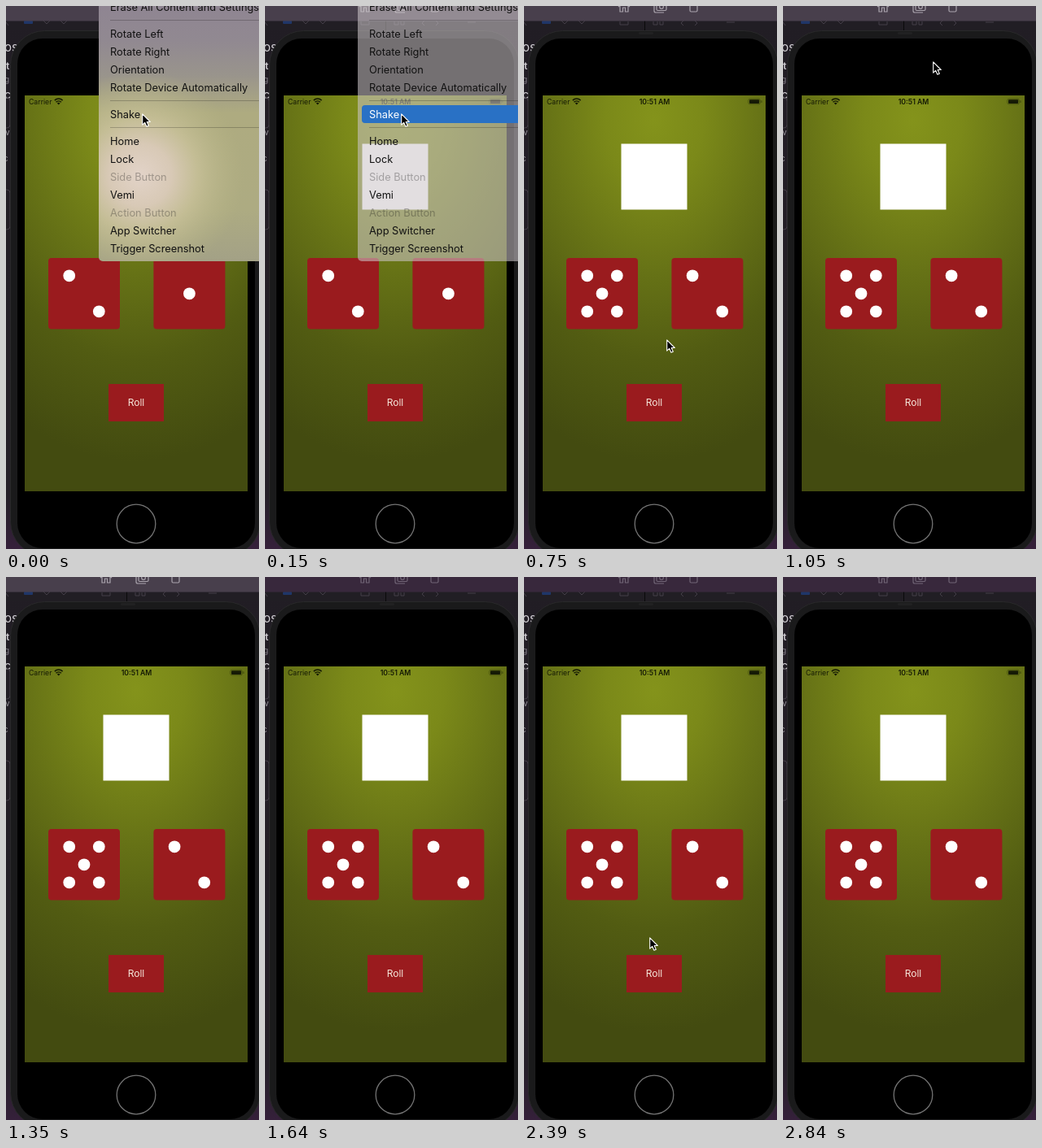
An HTML page that plays this animation: 311 px wide and 668 px high, repeating every 2990 ms.

```html
<!DOCTYPE html>
<html lang="en">
<head>
<meta charset="utf-8">
<title>Dice simulator</title>
<style>
  html, body { margin: 0; width: 100%; height: 100%; overflow: hidden; background: #1f1b22; }
  svg { display: block; width: 100%; height: 100%; }
  text { font-family: Inter, Roboto, "Liberation Sans", sans-serif; }
  .pip { fill: #fff; }
  .red { fill: #9a1b1e; }
</style>
</head>
<body>
<svg viewBox="0 0 311 668" xmlns="http://www.w3.org/2000/svg">
  <defs>
    <radialGradient id="felt" gradientUnits="userSpaceOnUse" cx="0" cy="0" r="1"
      gradientTransform="translate(160 140) scale(300 420)">
      <stop offset="0" stop-color="#84931b"/>
      <stop offset=".2" stop-color="#7b8919"/>
      <stop offset=".45" stop-color="#667216"/>
      <stop offset=".7" stop-color="#525c12"/>
      <stop offset="1" stop-color="#434b10"/>
    </radialGradient>
    <linearGradient id="frost" x1="0" y1="0" x2="0" y2="1">
      <stop offset="0" stop-color="#8f8592"/>
      <stop offset=".14" stop-color="#918991"/>
      <stop offset=".27" stop-color="#99948c"/>
      <stop offset=".42" stop-color="#aeab80"/>
      <stop offset=".8" stop-color="#adab82"/>
      <stop offset="1" stop-color="#a3a186"/>
    </linearGradient>
    <radialGradient id="glow" gradientUnits="userSpaceOnUse" cx="165" cy="208" r="128">
      <stop offset="0" stop-color="#e2d3c8"/>
      <stop offset=".3" stop-color="#d8c9b6"/>
      <stop offset=".55" stop-color="#c6bf97" stop-opacity=".9"/>
      <stop offset="1" stop-color="#b6b483" stop-opacity="0"/>
    </radialGradient>
    <linearGradient id="desk" x1="0" y1="0" x2="0" y2="1">
      <stop offset="0" stop-color="#211d24"/>
      <stop offset=".9" stop-color="#251f28"/>
      <stop offset="1" stop-color="#35203a"/>
    </linearGradient>
  </defs>

  <rect width="311" height="668" fill="url(#desk)"/>
  <g id="editor">
    <rect y="18" width="311" height="12" fill="#211e24"/>
    <rect x="22" y="18" width="11" height="4" rx="1" fill="#1f3668"/>
    <g fill="none" stroke="#443e48">
      <path d="M0 20l3 4M46 18l4 4 4-4M67 18l4 4 4-4M118 19v4h10v-4M159 19v4h5v-4M167 19v4h4v-4M196 18l-3 3 3 3M210 18l3 3-3 3M249 20h10"/>
    </g>
    <path d="M148.500 18v12" stroke="#09090a"/>
    <g fill="#d2cfd4">
      <text x="-2" y="56" font-size="15">os</text>
      <text x="0" y="78" font-size="12" font-weight="600">t</text>
      <text x="-2" y="94" font-size="10" fill="#827d86">g</text>
      <text x="-2" y="114" font-size="14">c</text>
      <text x="-1" y="159" font-size="10" fill="#98949b">v</text>
      <text x="-3" y="191" font-size="10" fill="#98949b">c</text>
    </g>
    <g fill="none" stroke="#443e48">
      <rect x="-12" y="113" width="17" height="37" rx="4"/>
      <rect x="-12" y="226" width="17" height="49" rx="4"/>
    </g>
  </g>
  <rect id="bar" width="311" height="18.500"/>
  <g id="barIcons" fill="none" stroke-width="1.200">
    <path d="M116 1l7-6 7 6M118 0v7h3.500V2h3v5h3.500V0"/>
    <path d="M160 0v6q0 2 2 2h10M163-4h12v8q0 1.500-1.500 1.500h-9q-1.500 0-1.500-1.500z"/>
    <circle cx="169" cy="1" r="2.300"/>
    <rect x="204" y="-7" width="9" height="14" rx="1.500"/>
  </g>

  <rect x="5.500" y="30.500" width="307" height="646" rx="42" fill="#1a1a1b" stroke="#29292a"/>
  <rect x="141" y="32" width="18" height="3" rx="1" fill="#212122"/>
  <rect x="14" y="40" width="292" height="627" rx="31" fill="#000"/>
  <circle cx="160" cy="637" r="23.800" fill="none" stroke="#737373" stroke-width="1.300"/>
  <rect x="23" y="110" width="274" height="487" fill="url(#felt)"/>

  <g fill="#151a05">
    <text x="28" y="120.800" font-size="8.700">Carrier</text>
    <text x="160.500" y="120.800" font-size="8.700" font-weight="600" text-anchor="middle">10:51 AM</text>
    <path d="M62.800 119.600l1.900 2 1.900-2a2.700 2.700 0 0 0-3.800 0z"/>
    <path d="M61.500 118.200a4.600 4.600 0 0 1 6.400 0M59.800 116.100a7 7 0 0 1 9.800 0" fill="none" stroke="#151a05" stroke-width="1.500"/>
    <rect x="275.800" y="114.300" width="14.600" height="6.600" rx="2" fill="none" stroke="#151a05" stroke-opacity=".4" stroke-width=".8"/>
    <rect x="277" y="115.300" width="12.200" height="4.600" rx="1"/>
    <rect x="291.500" y="116.300" width="1" height="2.600" opacity=".5"/>
  </g>

  <rect x="119.500" y="169.500" width="81" height="81" fill="#fff"/>
  <g id="dice"></g>
  <rect class="red" x="126" y="465" width="68" height="46"/>
  <text x="160" y="492.300" font-size="12" text-anchor="middle" fill="#f5e6da">Roll</text>

  <g id="menu">
    <path id="panel" d="M114 0H311V314H119a5 5 0 0 1-5-5z"/>
    <path id="panelGlow" d="M114 0H311V314H119a5 5 0 0 1-5-5z" fill="url(#glow)"/>
    <path d="M128 17.500H311M128 116.500H311M128 149.500H311" stroke="#000" stroke-opacity=".22"/>
    <path id="highlight" d="M311 122H123a4 4 0 0 0-4 4v14a4 4 0 0 0 4 4H311z" fill="#2971c5"/>
    <g id="items" font-size="12.800"></g>
  </g>
  <path id="cursor" d="M.7.800V14.200L3.700 11.400 5.900 16.300 8.300 15.300 6.200 10.500H10.300z"
    fill="#000" stroke="#fff" stroke-width="1.100" stroke-linejoin="round"/>
</svg>
<script>
const LOOP = 2990;
const MENU_FADE = 150, MENU_GONE = 300, BAR_DIMS = 1640;
const $ = id => document.getElementById(id);

// Pointer stops: start time, then position; no position means hidden.
const stops = [
  [0, 167, 132], [300, 189, 220], [450, 207, 294], [750, 175, 410],
  [900, 179, 213], [1050, 184, 68], [1350],
  [2090, 142, 25], [2240, 146, 293], [2390, 154, 443],
  [2540, 163, 565], [2690, 168, 588], [2840]
];

const menuItems = [
  ["Erase All Content and Settings…", 1], ["Rotate Left", 34], ["Rotate Right", 56],
  ["Orientation", 78], ["Rotate Device Automatically", 100], ["Shake", 133],
  ["Home", 166], ["Lock", 188], ["Side Button", 210, true], ["Vemi", 232],
  ["Action Button", 254, true], ["App Switcher", 276], ["Trigger Screenshot", 298]
];

$("items").innerHTML = menuItems.map(([label, y, disabled]) =>
  `<text x="128" y="${y + 4.5}" fill="#111" fill-opacity="${disabled ? .3 : 1}">${label}</text>`
).join("");
const shake = $("items").children[5];

const pipLayouts = {
  1: [[0, 0]],
  2: [[-1, -1], [1, 1]],
  5: [[-1, -1], [1, -1], [0, 0], [-1, 1], [1, 1]]
};

function die(cx, value) {
  const cy = 353.8;
  const pips = pipLayouts[value].map(([x, y]) =>
    `<circle class="pip" cx="${cx + x * 18.3}" cy="${cy + y * 22}" r="7.4"/>`);
  return `<rect class="red" x="${cx - 44}" y="310" width="88" height="87.5" rx="4"/>` + pips.join("");
}

let shownRoll = "";
function showDice(left, right) {
  const roll = `${left},${right}`;
  if (roll === shownRoll) return;
  shownRoll = roll;
  $("dice").innerHTML = die(96, left) + die(225.4, right);
}

function showMenu(t) {
  const fading = t >= MENU_FADE;
  $("menu").style.display = t < MENU_GONE ? "" : "none";
  $("panel").setAttribute("fill", fading ? "#cdc5c8" : "url(#frost)");
  $("panel").setAttribute("fill-opacity", fading ? .57 : 1);
  $("panelGlow").style.display = fading ? "none" : "";
  $("highlight").style.display = fading ? "" : "none";
  shake.setAttribute("fill", fading ? "#fff" : "#111");
}

function showBar(t) {
  const dim = t >= BAR_DIMS;
  $("bar").setAttribute("fill", dim ? "#38283c" : "#483f4c");
  $("barIcons").setAttribute("stroke", dim ? "#716576" : "#aaa4ad");
}

function showCursor(t) {
  const [, x, y] = stops.filter(stop => stop[0] <= t).pop();
  $("cursor").style.display = x === undefined ? "none" : "";
  if (x !== undefined) $("cursor").setAttribute("transform", `translate(${x} ${y})`);
}

function render(t) {
  showMenu(t);
  showBar(t);
  showCursor(t);
  if (t < MENU_GONE) showDice(2, 1);
  else showDice(5, 2);
}

const start = performance.now();
function tick(now) {
  render(Math.max(0, now - start) % LOOP);
  requestAnimationFrame(tick);
}
render(0);
requestAnimationFrame(tick);
</script>
</body>
</html>
```
